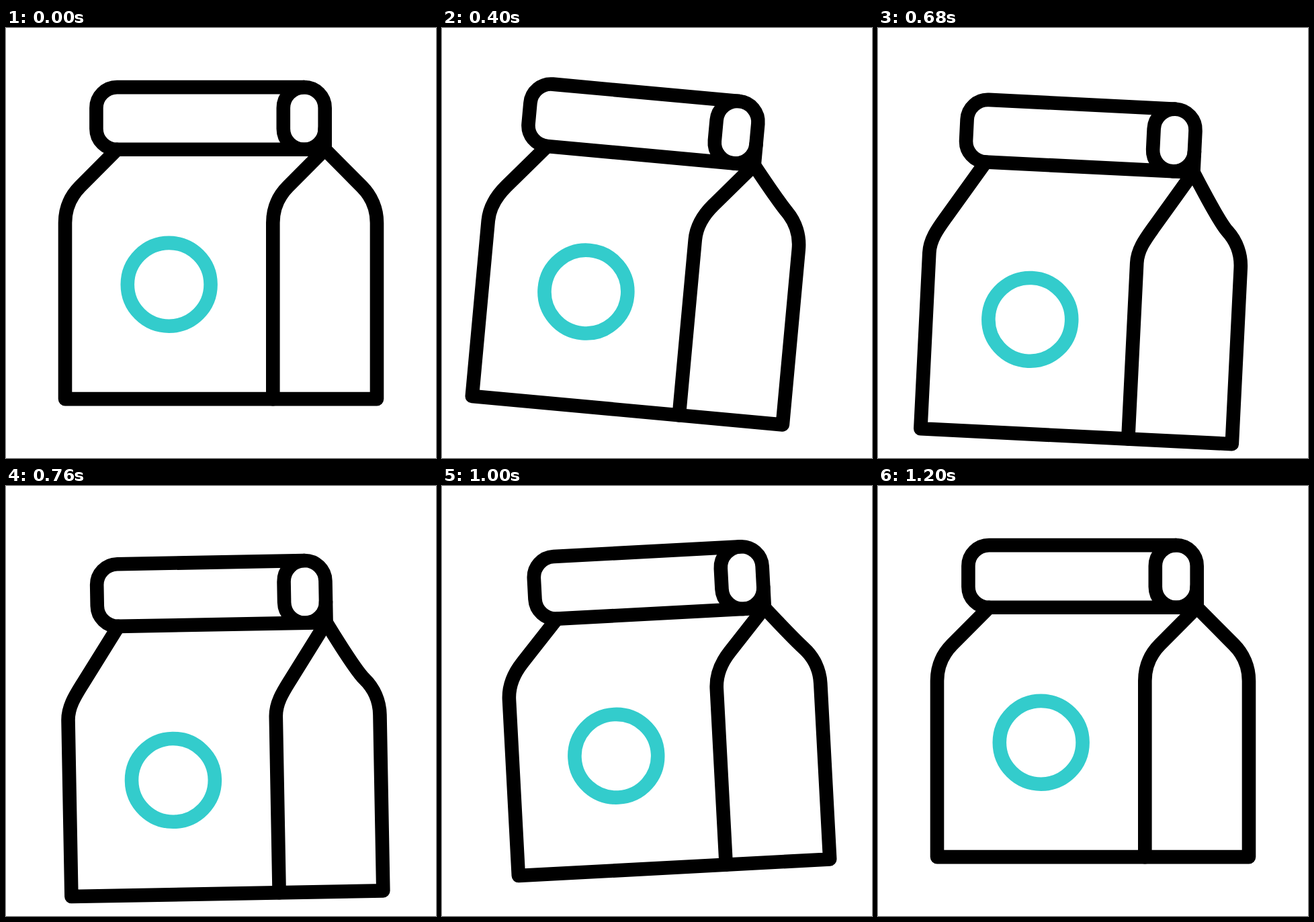
Recreate the animation shown at these times as an HTML page. Size 640x640 px, loop 1.4 s.

```html
<!DOCTYPE html>
<html lang="en">
<head>
<meta charset="utf-8">
<title>Paper bag</title>
<style>
  html, body { margin: 0; width: 100%; height: 100%; overflow: hidden; background: #fff; }
  svg { display: block; width: 100vw; height: 100vh; }
  .line { fill: none; stroke: #000; stroke-width: 20.6; stroke-linecap: round; stroke-linejoin: round; }
  .badge { stroke: #3cc; }
</style>
</head>
<body>
<svg viewBox="0 0 640 640">
  <g id="bag">
    <path id="body" class="line"/>
    <path id="fold" class="line"/>
    <path class="line" d="M443.7 88.1H165.3A30.9 30.9 0 0 0 134.4 119V149.9A30.9 30.9 0 0 0 165.3 180.8H474.7V149.9"/>
    <rect class="line" x="412.8" y="88.1" width="61.9" height="92.7" rx="30.9"/>
    <circle id="badge" class="line badge" cx="242.7" r="61.9"/>
  </g>
</svg>
<script>
const LOOP = 1400, STEP = 40, START = 216, END = 1200;
const PIVOT = '320 78';
const EASE = [0.333, 0.667];

// Rows: time, value, horizontal handles of the easing that leads there.
const tilt = [[START, 0], [540, 7.05, [0.333, 0.44]], [876, -4.15, EASE], [END, 0, [0.43, 0.667]]];
const drop = [[START, 0], [708, 26.6, [0.333, 0.55]], [END, 0, [0.23, 0.68]]];
const stretch = [[START, 0], [708, 30.1, EASE], [END, 0, [0.45, 0.43]]];

const $ = id => document.getElementById(id);

// Cubic easing, flat at both ends.
function ease(x, [x1, x2]) {
  let lo = 0, hi = 1, u = x;
  for (let i = 0; i < 30; i++) {
    u = (lo + hi) / 2;
    const v = 1 - u;
    if (3 * u * v * v * x1 + 3 * u * u * v * x2 + u * u * u < x) lo = u;
    else hi = u;
  }
  return u * u * (3 - 2 * u);
}

function valueAt(track, t) {
  if (t <= START || t >= END) return 0;
  const i = track.findIndex(row => row[0] > t);
  const [t0, v0] = track[i - 1], [t1, v1, handles] = track[i];
  return v0 + (v1 - v0) * ease((t - t0) / (t1 - t0), handles);
}

// Left-leaning shoulder, from its neck down to the vertical side.
function shoulder(x, s) {
  const dx = 55, dy = 55.3 + s, k = 20.3 / Math.hypot(dx, dy);
  const kneeX = x + 22.3, kneeY = 236.1 + s;
  return `M${x + 77.3} 180.8L${kneeX} ${kneeY}` +
    `C${kneeX - dx * k} ${kneeY + dy * k} ${x} ${269.7 + s} ${x} ${290 + s}V${552.1 + s}`;
}

function draw(time) {
  const t = Math.floor(time % LOOP / STEP) * STEP;
  const s = valueAt(stretch, t);
  $('bag').setAttribute('transform',
    `translate(0 ${valueAt(drop, t)}) rotate(${valueAt(tilt, t)} ${PIVOT})`);
  $('body').setAttribute('d', shoulder(88, s) +
    `H552V${290 + s}C552 ${269.7 + s} 544 ${250.4 + s} 529.7 ${236.1 + s}` +
    `C${529.7 - 14} ${236.1 + s - 14} 474.7 180.8 474.7 180.8`);
  $('fold').setAttribute('d', shoulder(397.3, s));
  $('badge').setAttribute('cy', 381.8 + s);
}

const begin = performance.now();
function tick() {
  draw(performance.now() - begin);
  requestAnimationFrame(tick);
}
tick();
</script>
</body>
</html>
```
